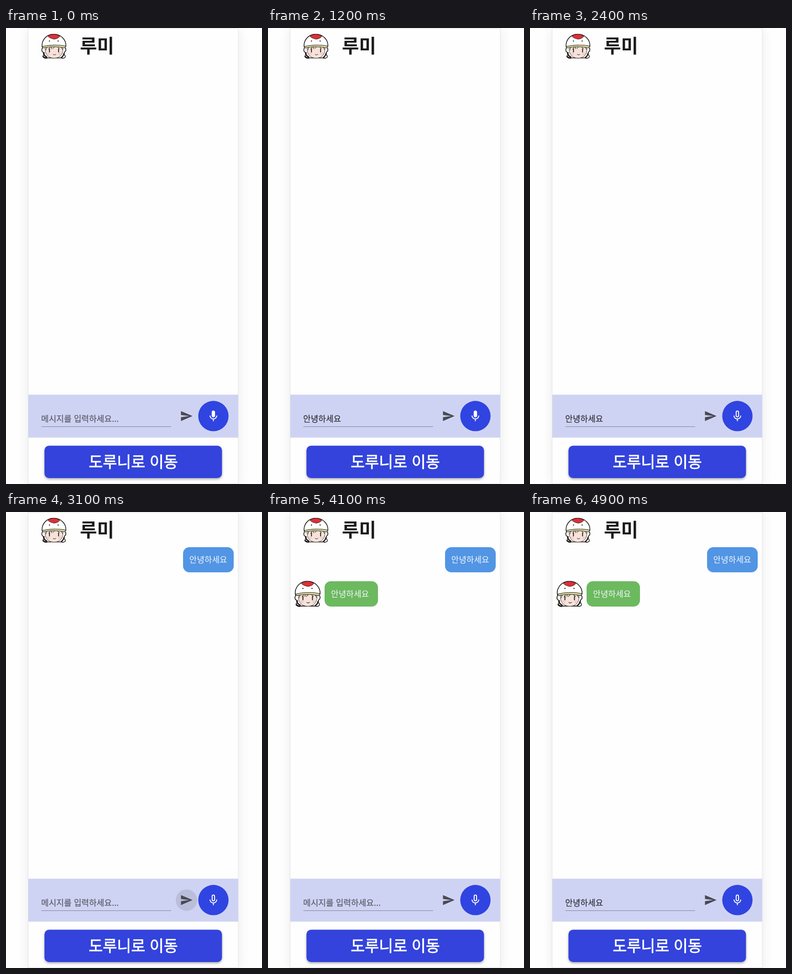
Write an HTML page that moves like this. It is 561x998 px and loops after 5 s.

```html
<!DOCTYPE html>
<html lang="ko">
<head>
<meta charset="utf-8">
<title>Chat</title>
<style>
  html, body { margin: 0; width: 100%; height: 100%; overflow: hidden; background: #fefefe; }
  svg { display: block; width: 561px; height: 998px; }
  text { font: 18.1px 'Noto Sans CJK KR', 'Noto Sans KR', 'Noto Sans CJK', sans-serif; }
  #card { fill: #fefefe; stroke: #e3e3e4; filter: drop-shadow(0 2px 11px rgba(0, 0, 0, .08)); }
  #button { fill: #3343dc; filter: drop-shadow(0 3px 2px rgba(0, 0, 0, .2)) drop-shadow(0 1px 3px rgba(0, 0, 0, .15)); }
  #label { font-size: 33.7px; fill: #fff; stroke: #fff; stroke-width: .8px; }
  #field { stroke-width: .25px; }
  .bubble { fill: #f3f6fb; }
</style>
</head>
<body>
<svg viewBox="0 0 561 998">
  <defs>
    <symbol id="avatar" viewBox="0 0 56 56">
      <g stroke="#16120f" stroke-width="1.5" stroke-linecap="round" stroke-linejoin="round" fill="none">
        <path fill="#fff" d="M5 29C1 31 0 37 3 40L7 42 5 47Q2 50 5 52 9 55 13 53L44 53Q48 55 52 52 54 49 50 45L51 40C55 38 55 32 51 29Z"/>
        <path fill="#f6e2da" stroke-width=".8" d="M9 29C7 40 11 53 28 53.500 45 53 49 41 47 28Z"/>
        <path stroke-width="2.600" d="M5 43Q7 49 12 51M50 43Q48 50 44 52M4 50Q8 54 12 53"/>
        <path stroke-width="1" d="M12 30L10 36M20 29L16 34M29 29L25 33M36 29L40 33M43 29L47 35M23 29L22 33"/>
        <path fill="#fff" d="M2 29C0 14 12 1 27 1 43 1 55 13 54 28Q28 22 2 29Z"/>
        <path fill="#db3038" stroke-width=".8" d="M14 5Q27-3 41 5 38 11 28 12 18 10 14 5Z"/>
        <path fill="#e3e0a2" stroke-width="1" d="M2 28Q28 22 54 27L51 31Q28 26 5 31Z"/>
        <path stroke-width="2.400" d="M18 16h.01M37 16h.01"/>
        <path stroke-width="1.800" d="M18 33v7M38 33v7"/>
        <path stroke-width="1" d="M26 45Q29 48 32 45"/>
      </g>
      <g fill="#f2b5b0" opacity=".4">
        <ellipse cx="15" cy="44" rx="4" ry="3"/>
        <ellipse cx="41" cy="44" rx="4" ry="3"/>
      </g>
    </symbol>
  </defs>

  <rect id="card" x="48.500" y="1" width="460.500" height="996.500"/>
  <use href="#avatar" x="77" y="12.500" width="56.500" height="56"/>
  <text x="162" y="54" fill="#1d1c1f" style="font-size:40.700px;font-weight:700">루미</text>

  <g id="sent" class="bubble">
    <rect x="388" y="77" width="111" height="55" rx="14" fill="#5195e4"/>
    <text x="401.500" y="111">안녕하세요</text>
  </g>
  <g id="reply" class="bubble">
    <use href="#avatar" x="57" y="150.500" width="60" height="58.500"/>
    <rect x="124" y="151.500" width="117" height="55.500" rx="14" fill="#6cb95f"/>
    <text x="138" y="185.500">안녕하세요</text>
  </g>

  <rect x="49" y="802.500" width="460" height="94" fill="#cfd3f3"/>
  <text id="field" x="77" y="862"></text>
  <path d="M77.500 872.500H362" stroke="#7c7f95" stroke-width="1.200"/>
  <circle id="ripple" cx="395.500" cy="849.500" r="23.500"/>
  <path fill="#494a55" transform="translate(381 834.800) scale(1.210)" d="M2 21 23 12 2 3V10L17 12 2 14Z"/>

  <circle cx="454.500" cy="849.300" r="33.200" fill="#3044e1"/>
  <g transform="translate(439.800 834.800) scale(1.220)" fill="#fff">
    <rect x="9" y="2" width="6" height="12" rx="3"/>
    <rect id="hollow" x="10.700" y="3.700" width="2.600" height="8.600" rx="1.300" fill="#3044e1"/>
    <path fill="none" stroke="#fff" stroke-width="1.700" d="M5.900 11a6.100 6 0 0 0 12.200 0M12 17V21"/>
  </g>

  <rect id="button" x="84.300" y="914.300" width="389" height="70.700" rx="10"/>
  <text id="label" x="279" y="962" text-anchor="middle">도루니로 이동</text>
</svg>
<script>
  const $ = id => document.getElementById(id);
  const show = (id, on) => $(id).style.visibility = on ? 'visible' : 'hidden';

  function draw(now) {
    const t = Math.floor(now % 5000 / 100) * 100;
    const filled = t >= 1200 && t < 3100 || t >= 4200;
    const ink = filled ? '#30313a' : '#5a5c68';
    $('field').textContent = filled ? '안녕하세요' : '메시지를 입력하세요...';
    $('field').setAttribute('fill', ink);
    $('field').setAttribute('stroke', ink);
    show('sent', t >= 3100);
    show('reply', t >= 4100);
    show('hollow', t >= 2400);
    // press highlight fades out after sending
    const k = Math.min(1, (t - 3100) / 400);
    $('ripple').setAttribute('opacity', k < 0 ? 0 : .1 * (1 + Math.cos(Math.PI * k)) / 2);
    requestAnimationFrame(draw);
  }
  draw(0);
</script>
</body>
</html>
```
